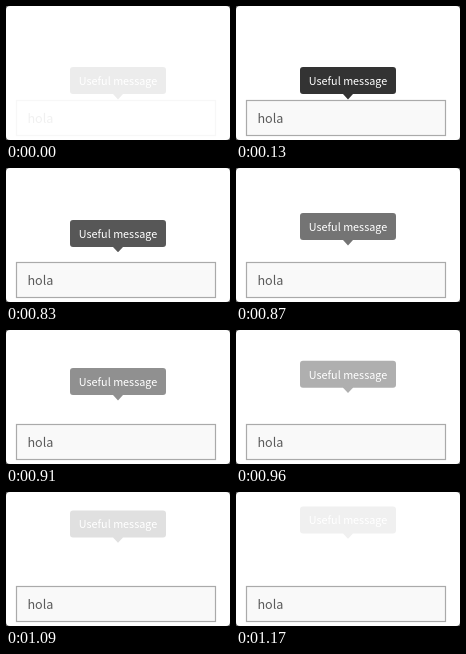
Animation, 224 px wide and 134 px high, one loop 1750 ms. Source, as an HTML page with a canvas:

```html
<!DOCTYPE html>
<html lang="en">
<head>
<meta charset="utf-8">
<title>Rising tooltip</title>
<style>
  html, body { margin: 0; width: 100%; height: 100%; overflow: hidden; background: #fff; }
  canvas { display: block; }
</style>
</head>
<body>
<canvas id="stage" width="224" height="134"></canvas>
<script>
const ctx = document.getElementById('stage').getContext('2d');
const FONT = '"Noto Sans CJK JP", "Noto Sans CJK SC", "Noto Sans CJK", "Noto Sans", sans-serif';

const LOOP = 1750;
const FAINT_UNTIL = 130;
const FAINT = 0.09;

// The exit eases over EASE_TIME but is seen in even steps and stops before it completes
const EXIT_START = 780;
const EXIT_END = 1170;
const STEPS = 9;
const EASE_START = 735;
const EASE_TIME = 640;
const REST_TOP = 61;
const RISE = 50;

// CSS "ease": cubic-bezier(.25, .1, .25, 1)
function ease(x) {
  const bezier = (s, a, b) => 3 * a * s * (1 - s) ** 2 + 3 * b * s * s * (1 - s) + s ** 3;
  let low = 0;
  let high = 1;
  for (let i = 0; i < 20; i++) {
    const mid = (low + high) / 2;
    if (bezier(mid, 0.25, 0.25) < x) low = mid;
    else high = mid;
  }
  return bezier(low, 0.1, 1);
}

function exitProgress(time) {
  if (time < EXIT_START) return 0;
  const span = EXIT_END - EXIT_START;
  const elapsed = Math.floor(time / 10) * 10 - EXIT_START;
  const step = Math.min(STEPS, Math.floor(elapsed * STEPS / span));
  const shownAt = EXIT_START + Math.ceil(step * span / STEPS / 10) * 10;
  return ease((shownAt - EASE_START) / EASE_TIME);
}

function drawText(text, x, y, size, color, align) {
  ctx.font = `400 ${size}px ${FONT}`;
  ctx.textAlign = align;
  ctx.fillStyle = color;
  ctx.fillText(text, x, y);
}

function drawCard() {
  ctx.globalAlpha = 1;
  ctx.fillStyle = '#555';
  ctx.fillRect(0, 0, 224, 134);
  ctx.fillStyle = '#fff';
  ctx.beginPath();
  ctx.roundRect(0, 0, 224, 134, 4);
  ctx.fill();
}

function drawField(opacity) {
  ctx.globalAlpha = opacity;
  ctx.fillStyle = '#f9f9f9';
  ctx.fillRect(10, 94, 200, 36);
  ctx.strokeStyle = '#aaa';
  ctx.lineWidth = 1.2;
  ctx.strokeRect(10.5, 94.5, 199, 35);
  drawText('hola', 21.4, 117, 12.6, '#5a5a5a', 'left');
}

function drawTooltip(top, opacity) {
  ctx.globalAlpha = opacity;
  ctx.fillStyle = '#333';
  ctx.beginPath();
  ctx.roundRect(64, top, 96, 27, 3);
  ctx.moveTo(107, top + 27);
  ctx.lineTo(117, top + 27);
  ctx.lineTo(112, top + 32.4);
  ctx.closePath();
  ctx.fill();
  ctx.globalAlpha = 1;
  drawText('Useful message', 112, top + 18, 10.8, '#fff', 'center');
}

const start = performance.now();

function render() {
  const time = (performance.now() - start) % LOOP;
  const progress = exitProgress(time);
  const fade = time < FAINT_UNTIL ? FAINT : 1;
  drawCard();
  drawField(fade);
  drawTooltip(REST_TOP - RISE * progress, fade * (1 - progress));
  requestAnimationFrame(render);
}

render();
</script>
</body>
</html>
```
